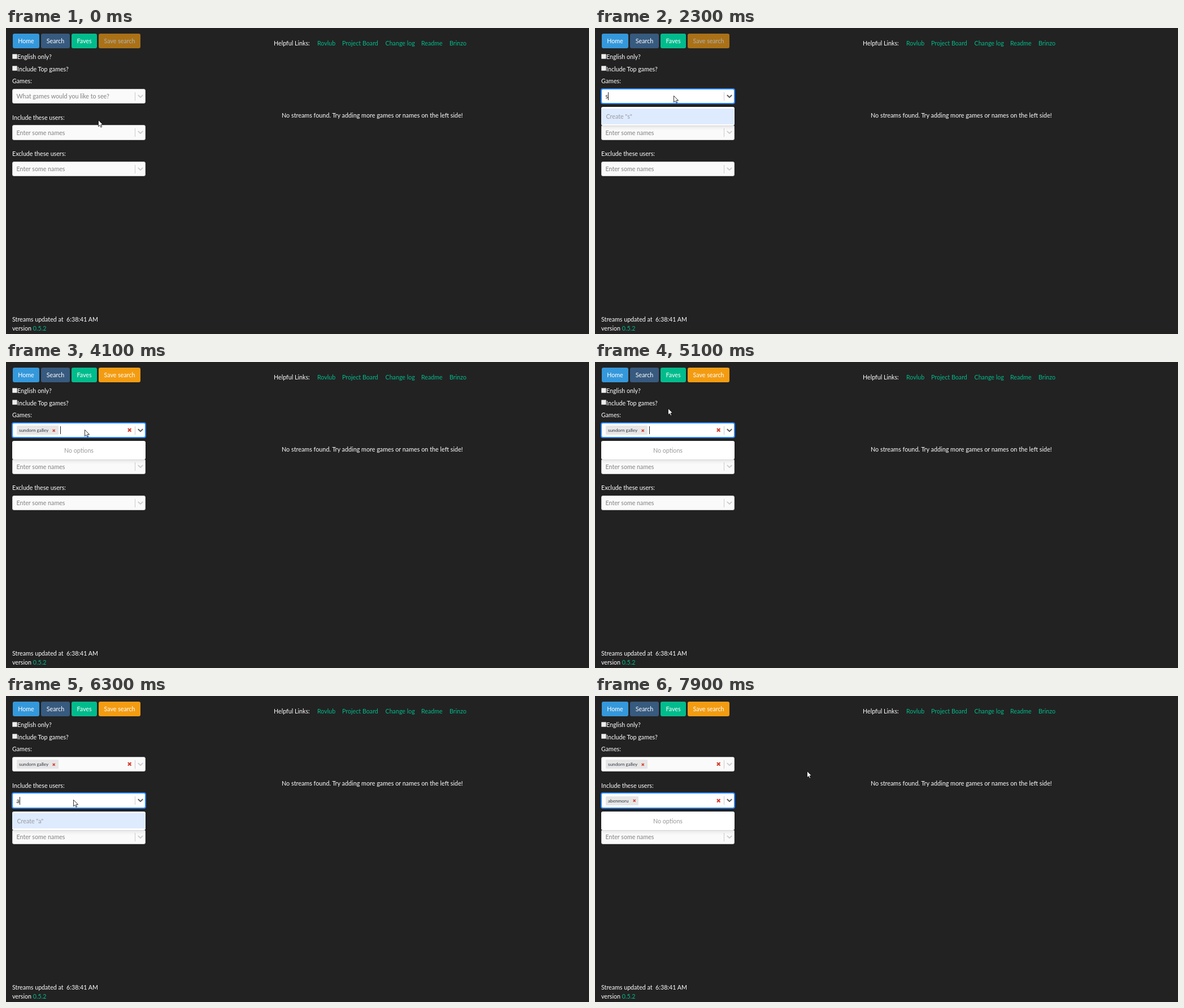
Write an HTML page that moves like this. It is 1032x543 px and loops after 8000 ms.

```html
<!DOCTYPE html>
<html lang="en">
<head>
<meta charset="utf-8">
<title>Stream search</title>
<style>
  html, body { margin: 0; width: 100%; height: 100%; overflow: hidden; background: #222; }
  body { position: relative; font: 10.7px/16px Lato, sans-serif; color: #fff; }
  body * { position: absolute; box-sizing: border-box; white-space: pre; }
  a, .green { color: #00bc8c; }
  .green, .tag b { position: static; font-weight: 400; }
  .btn { top: 10px; height: 26px; line-height: 26px; border-radius: 3px; text-align: center; }
  .check { left: 11px; width: 9px; height: 9px; background: #eee; border: 1px solid #b4b4b4; border-radius: 1px; }
  .label { left: 11px; }
  .check + .label { left: 20px; }
  .link { top: 19px; }
  .message { left: 488px; top: 147px; font-size: 10.8px; }
  .field { left: 11px; width: 236px; height: 26.6px; }
  .box { inset: 0; background: #fafafa; border: 1px solid #ccc; border-radius: 3px; }
  .hover .box { border-color: #b3b3b3; }
  .soon .box { border-color: #8ab4ea; }
  .focus .box { background: #fff; border-color: #2684ff; box-shadow: 0 0 0 1px #2684ff; }
  .hint, .line { left: 7.5px; top: 5.5px; color: #808080; }
  .line { height: 16px; display: flex; align-items: center; color: #222; }
  .line > * { position: relative; flex: none; }
  .tag { height: 16px; padding: 0 17.5px 0 4.5px; margin-right: 3px; border-radius: 1.5px; background: #e6e6e6; color: #2b3442; font-size: 8.2px; }
  .tag svg { right: 5px; top: 5.4px; width: 5.4px; height: 5.4px; }
  .caret { width: 1px; height: 14px; background: #222; }
  .bar { left: 217px; top: 6px; width: 1px; height: 15px; background: #ccc; }
  .chev { left: 222px; top: 10px; width: 10px; height: 7px; fill: none; stroke: #ccc; stroke-width: 1.8; stroke-linecap: round; stroke-linejoin: round; }
  .focus .chev { stroke: #555; }
  .clear { left: 203.5px; top: 9.8px; width: 7.4px; height: 7.4px; }
  .cross { stroke: #d8392b; stroke-width: 2.3; fill: none; }
  .menu { left: 0; top: 32.6px; width: 236px; height: 33.2px; border-radius: 3px; background: #fff; color: #999;
    box-shadow: 0 0 0 .72px rgba(0,0,0,.1), 0 2.9px 7.9px rgba(0,0,0,.1); }
  .option { left: 0; right: 0; top: 3px; height: 27.6px; line-height: 27.4px; padding: 0 8.5px; text-align: center; }
  .create { background: #deebff; text-align: left; }
  #pointer { left: -.5px; top: 0; width: 10px; height: 15px; overflow: visible; z-index: 9; }
</style>
</head>
<body>
<div class="btn" style="left:12px;width:47px;background:#3498db">Home</div>
<div class="btn" style="left:62px;width:51px;background:#375a7f">Search</div>
<div class="btn" style="left:116px;width:45px;background:#00bc8c">Faves</div>
<div class="btn" id="save" style="left:164px;width:74px;background:#f39c12">Save search</div>

<div class="check" style="top:45.5px"></div><div class="label" style="top:43px">English only?</div>
<div class="check" style="top:67px"></div><div class="label" style="top:64.5px">Include Top games?</div>
<div class="label" style="top:86px">Games:</div>
<div class="label" style="top:150.5px">Include these users:</div>
<div class="label" style="top:215px">Exclude these users:</div>

<div class="link" style="left:474px">Helpful Links:</div>
<a class="link" style="left:551px">Rovlub</a>
<a class="link" style="left:595px">Project Board</a>
<a class="link" style="left:671.5px">Change log</a>
<a class="link" style="left:735px">Readme</a>
<a class="link" style="left:785px">Brinzo</a>
<div class="message">No streams found. Try adding more games or names on the left side!</div>

<div class="label" style="top:509px">Streams updated at&nbsp; 6:38:41 AM</div>
<div class="label" style="top:524.7px">version <span class="green">0.5.2</span></div>

<svg id="pointer" viewBox="0 0 10 15"><path d="M.5 .3V11.8L3.1 9.4 4.9 13.2 6.7 12.4 5 8.6H8.5Z" fill="#fff" stroke="#000" stroke-width=".8"/></svg>

<script>
const LOOP = 8000, STEP = 100;
const pointer = document.getElementById('pointer');
const save = document.getElementById('save');
const cross = cls => `<svg class="cross ${cls}" viewBox="0 0 8 8"><path d="M1 1L7 7M7 1L1 7"/></svg>`;
const show = (el, on) => { el.style.display = on ? '' : 'none'; };

// bursts: when a run of letters starts, and its letters; pace: ms per letter
const idle = { hint: 'Enter some names', bursts: [], pace: STEP, click: LOOP, blur: LOOP, enter: LOOP };
const fields = [
  { hint: 'What games would you like to see?', click: 1000, blur: 5500, enter: 4100, opensOnClick: true,
    bursts: [[2300, 'sund'], [2800, 'orn'], [3400, ' gal'], [3900, 'ley']] },
  { click: 5500, enter: 7400, pace: 66,
    bursts: [[6300, 'a'], [6500, 'benm'], [6900, 'o'], [7100, 'ru']] },
  {}
].map((options, i) => makeField({ ...idle, ...options, top: 107.7 + 64.4 * i }));

function makeField(f) {
  const root = document.createElement('div');
  root.className = 'field';
  root.style.top = f.top + 'px';
  root.innerHTML = `<div class="box"></div><div class="hint">${f.hint}</div>
    <div class="line"><span class="tag"><b>${f.bursts.map(b => b[1]).join('')}</b>${cross('')}</span><span class="text"></span><i class="caret"></i></div>
    ${cross('clear')}<div class="bar"></div>
    <svg class="chev" viewBox="0 0 10 7"><path d="M1.3 1.5L5 5.1 8.7 1.5"/></svg>
    <div class="menu"><div class="option"></div></div>`;
  document.body.append(root);
  const ui = { root };
  for (const name of ['hint', 'tag', 'text', 'caret', 'clear', 'menu', 'option']) ui[name] = root.querySelector('.' + name);
  return { ...f, ui };
}

// pointer stops: time, x, y
const stops = [
  [0, 163, 163], [200, 156, 132], [300, 156, 132], [900, 139, 120],
  [4500, 139, 120], [5100, 129, 82], [5600, 119, 184], [7800, 119, 184], [7900, 375, 133]
];

function pointerAt(t) {
  const next = stops.findIndex(s => s[0] > t);
  if (next < 0) return stops.at(-1).slice(1);
  const [t0, ...from] = stops[next - 1], [t1, ...to] = stops[next];
  const u = (t - t0) / (t1 - t0), ease = u * u * (3 - 2 * u);
  return from.map((v, i) => Math.round(v + (to[i] - v) * ease));
}

const typedAt = (f, t) => f.bursts
  .map(([start, letters]) => t < start ? '' : letters.slice(0, 1 + Math.floor((t - start) / f.pace)))
  .join('');

function drawField(f, t, x, y) {
  const { root, hint, tag, text, caret, clear, menu, option } = f.ui;
  const active = t >= f.click && t < f.blur;
  const focus = f.click + STEP;
  const done = t >= f.enter;
  const typed = done ? '' : typedAt(f, t);
  const blink = t - (done ? f.enter : focus);

  root.classList.toggle('hover', x < 247 && y > f.top && y < f.top + 27);
  root.classList.toggle('soon', active && t < focus);
  root.classList.toggle('focus', active && t >= focus);
  root.style.zIndex = active ? 2 : 1;

  text.textContent = typed;
  show(hint, !typed && !done);
  show(tag, done);
  show(clear, done);
  show(caret, active && (typed || blink % 1000 < 500));
  show(menu, active && (f.opensOnClick || typed || done));
  option.classList.toggle('create', !!typed);
  option.textContent = typed ? `Create "${typed}"` : 'No options';
}

function frame() {
  const t = Math.floor(performance.now() % LOOP / STEP) * STEP;
  const [x, y] = pointerAt(t);
  fields.forEach(f => drawField(f, t, x, y));
  pointer.style.transform = `translate(${x}px, ${y}px)`;
  save.style.opacity = t >= fields[0].enter ? 1 : .65;
  requestAnimationFrame(frame);
}
frame();
</script>
</body>
</html>
```
